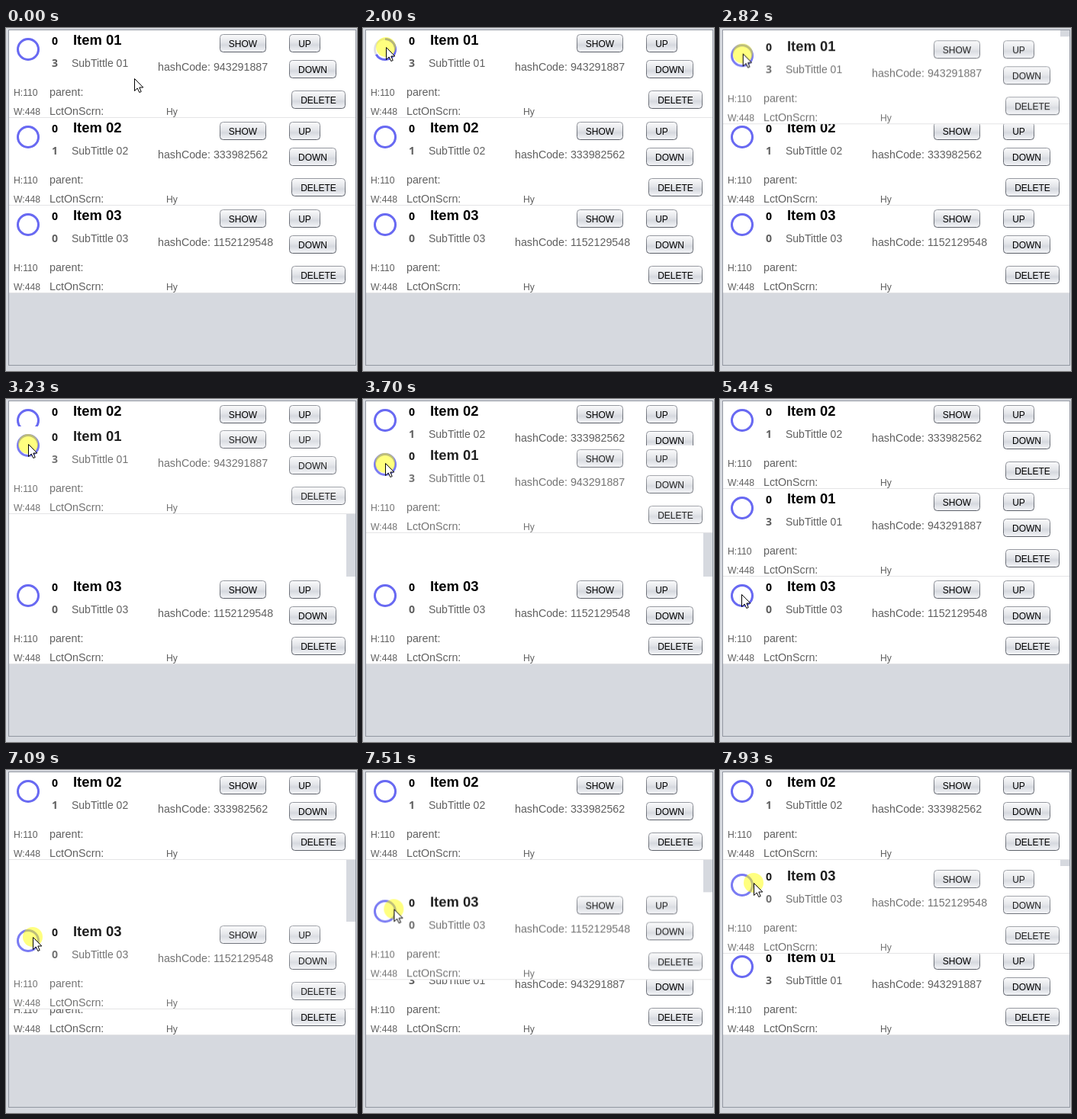
These frames come from a looping animation (460 px wide and 450 px high, 8 s). An HTML page:

```html
<!DOCTYPE html>
<html lang="en">
<head>
<meta charset="utf-8">
<title>Reorderable list</title>
<style>
  html, body { margin: 0; width: 100%; height: 100%; overflow: hidden; background: #d6d9df; }
  svg { display: block; font-family: "Liberation Sans", Arial, sans-serif; fill: #606060; }
  .title { font-size: 18.4px; font-weight: bold; fill: #000; }
  .count { font: bold 14px "Open Sans", "Noto Sans", sans-serif; }
  .first { fill: #000; }
  .sub { font-size: 14px; }
  .label { font-size: 14.25px; }
  .small { font-size: 12.2px; }
  .caption { font-size: 12px; fill: #000; text-anchor: middle; }
  .button { fill: url(#face); stroke: url(#edge); }
  .track, .arc { fill: none; stroke: #dedee2; stroke-width: 2.7; }
  .arc { stroke: #6869f3; stroke-width: 3; stroke-dasharray: 360; }

  .row, .content, .arc, #pointer, #press { animation: 8s step-end infinite; }
  #row1 { transform: translateY(3px); animation-name: row1; }
  #row2 { transform: translateY(118px); animation-name: row2; }
  #row3 { transform: translateY(233px); animation-name: row3; }
  #row1 .content { animation-name: lift1; }
  #row3 .content { animation-name: lift3; }
  #row1 .arc { animation-name: charge; }
  #row3 .arc { animation-name: charge; animation-delay: 4.27s; }
  #pointer { animation-name: point; }
  #press { animation-name: press; }

  @keyframes row1 {
    0% { transform: translateY(3px); }
    33.5% { transform: translateY(3px); animation-timing-function: steps(8); }
    40.375% { transform: translateY(36px); animation-timing-function: steps(4); }
    43.875% { transform: translateY(50px); animation-timing-function: steps(9); }
    51.625% { transform: translateY(99px); animation-timing-function: steps(2); }
    53.375% { transform: translateY(105px); }
    55% { transform: translateY(118px); }
    81%, 100% { transform: translateY(233px); }
  }
  @keyframes row2 {
    0% { transform: translateY(118px); }
    37%, 100% { transform: translateY(3px); }
  }
  @keyframes row3 {
    0% { transform: translateY(233px); }
    86% { transform: translateY(233px); animation-timing-function: steps(3); }
    88.625% { transform: translateY(199px); animation-timing-function: steps(9); }
    96.5% { transform: translateY(141px); animation-timing-function: steps(3); }
    99.125%, 100% { transform: translateY(126px); }
  }
  @keyframes lift1 {
    0% { opacity: 1; }
    25.875% { opacity: 1; animation-timing-function: steps(4); }
    29.375% { opacity: .88; }
    55%, 100% { opacity: 1; }
  }
  @keyframes lift3 {
    0% { opacity: 1; }
    79.25% { opacity: 1; animation-timing-function: steps(4); }
    82.75%, 100% { opacity: .88; }
  }
  @keyframes charge {
    0% { stroke-dashoffset: 0; }
    16.25% { stroke-dashoffset: 338; animation-timing-function: steps(10); }
    25% { stroke-dashoffset: 120; }
    25.875% { stroke-dashoffset: 98; }
    26.75%, 100% { stroke-dashoffset: 0; }
  }
  @keyframes press {
    0% { opacity: 0; }
    16.25% { opacity: 1; }
    55% { opacity: 0; }
    69.625%, 100% { opacity: 1; }
  }
  @keyframes point {
    0% { transform: translate(168px, 66px); }
    4.125% { transform: translate(168px, 66px); animation-timing-function: steps(4); }
    7.625% { transform: translate(110px, 22px); animation-timing-function: steps(3); }
    10.25% { transform: translate(60px, 8px); animation-timing-function: steps(3); }
    12.875% { transform: translate(27px, 14px); animation-timing-function: steps(2); }
    14.625% { transform: translate(30px, 25px); }
    33.5% { transform: translate(30px, 25px); animation-timing-function: steps(8); }
    40.375% { transform: translate(29px, 59px); animation-timing-function: steps(4); }
    43.875% { transform: translate(29px, 73px); animation-timing-function: steps(9); }
    51.625% { transform: translate(29px, 122px); animation-timing-function: steps(2); }
    53.375% { transform: translate(29px, 128px); }
    57.5% { transform: translate(29px, 129px); animation-timing-function: steps(6); }
    62.75% { transform: translate(27px, 193px); animation-timing-function: steps(6); }
    68% { transform: translate(28px, 256px); }
    86% { transform: translate(28px, 256px); animation-timing-function: steps(3); }
    88.625% { transform: translate(35px, 219px); animation-timing-function: steps(9); }
    96.5% { transform: translate(43px, 164px); animation-timing-function: steps(3); }
    99.125%, 100% { transform: translate(44px, 148px); }
  }
</style>
</head>
<body>
<svg width="460" height="450" viewBox="0 0 460 450">
  <defs>
    <linearGradient id="face" x2="0" y2="1">
      <stop offset="0" stop-color="#fbfbfc"/>
      <stop offset=".45" stop-color="#e3e5e9"/>
      <stop offset=".6" stop-color="#d6d9df"/>
      <stop offset="1" stop-color="#f4f5f8"/>
    </linearGradient>
    <linearGradient id="edge" x2="0" y2="1">
      <stop offset="0" stop-color="#95989f"/>
      <stop offset="1" stop-color="#5c6069"/>
    </linearGradient>
  </defs>
  <rect x="3.5" y="2.5" width="455" height="440" fill="#d6d9df" stroke="#9297a1"/>
  <rect x="4" y="3" width="442" height="345" fill="#fff"/>
  <g id="rows"></g>
  <g id="pointer">
    <circle id="press" r="13" fill="#ff0" fill-opacity=".5"/>
    <path d="M.5.5V16.5L4.2 13 6.8 18.5 9.2 17.5 6.8 12H11.8Z" fill="#fff" stroke="#000"/>
  </g>
</svg>
<script>
  const text = (kind, x, y, value) => `<text class="${kind}" x="${x}" y="${y}">${value}</text>`;

  const button = (x, y, width, caption) =>
    `<rect class="button" x="${x + .5}" y="${y + .5}" width="${width - 1}" height="23" rx="4"/>` +
    text("caption", x + width / 2, y + 17, caption);

  const row = ({ id, count, hash }) => `
    <g class="row" id="row${id}">
      <rect x="4" width="454" height="115" fill="#fff"/>
      <rect x="4" y="114" width="454" height="1" fill="#e4e4e6"/>
      <g class="content">
        <circle class="track" cx="29" cy="25" r="13.5"/>
        <circle class="arc" cx="29" cy="25" r="13.5" pathLength="360" transform="rotate(-90 29 25)"/>
        ${text("count first", 60, 19, 0)}
        ${text("count", 60, 48, count)}
        ${text("title", 88, 19, "Item 0" + id)}
        ${text("sub", 86, 48, "SubTittle 0" + id)}
        ${text("label", 199, 53, "hashCode: " + hash)}
        ${text("small", 10, 86, "H:110")}
        ${text("label", 57, 86, "parent:")}
        ${text("small", 10, 111, "W:448")}
        ${text("label", 57, 111, "LctOnScrn:")}
        ${text("small", 210, 111, "Hy")}
        ${button(280, 5, 61, "SHOW")}
        ${button(371, 5, 41, "UP")}
        ${button(371, 39, 62, "DOWN")}
        ${button(374, 79, 71, "DELETE")}
      </g>
    </g>`;

  // Paint order: a dragged row must cover the one it passes.
  document.getElementById("rows").innerHTML = [
    { id: 2, count: 1, hash: 333982562 },
    { id: 1, count: 3, hash: 943291887 },
    { id: 3, count: 0, hash: 1152129548 }
  ].map(row).join("");
</script>
</body>
</html>
```
